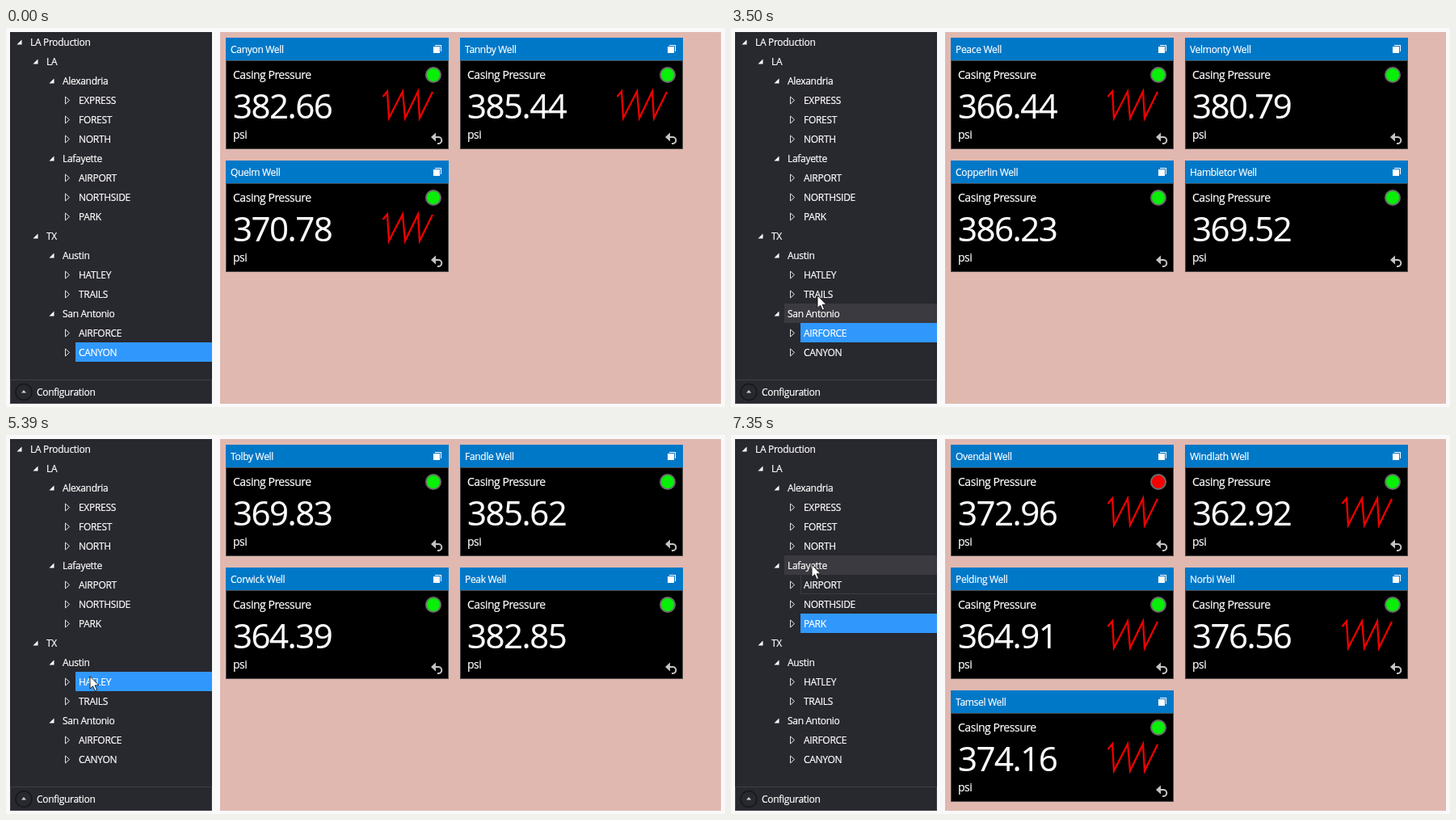
These frames come from a looping animation (890 by 469 pixels, 8000 ms). An HTML page:

```html
<!DOCTYPE html>
<html lang="en">
<head>
<meta charset="utf-8">
<title>Well dashboard</title>
<style>
  html, body { margin: 0; width: 100%; height: 100%; overflow: hidden; background: #f9f9f9; }
  svg { display: block; width: 890px; height: 469px; }
  text { font-family: "Open Sans", "Noto Sans", sans-serif; font-size: 12px; letter-spacing: -.3px;
    fill: #fff; stroke: #fff; stroke-width: .2px; }
  .label { font-size: 14px; letter-spacing: -.47px; }
  .value { font-size: 42px; letter-spacing: -1.5px; }
</style>
</head>
<body>
<svg viewBox="0 0 890 469" xmlns="http://www.w3.org/2000/svg">
  <rect x="5" y="5" width="250" height="460" fill="#28282f"/>
  <rect x="265" y="5" width="620" height="460" fill="#e0b8b0"/>
  <g id="marks"></g>
  <g id="tree"></g>
  <rect x="5.5" y="435.5" width="249" height="29" fill="none" stroke="#3e3e45"/>
  <circle cx="22" cy="450.5" r="10" fill="none" stroke="#17171b" stroke-width="1.5"/>
  <path d="M19 451.5l3-3.5 3 3.5z" fill="#d0d0d0"/>
  <text x="38" y="455">Configuration</text>
  <g id="cards"></g>
  <path id="cursor" d="M0 0V15.5L3.6 12.2 6.2 18 8.6 17 6.1 11.3H11Z" fill="#fff" stroke="#111" stroke-width=".9"/>
</svg>
<script>
const LOOP = 8000;
const $ = id => document.getElementById(id);

// Tree rows: one leading dot per level.
const rows = `LA Production
.LA
..Alexandria
...EXPRESS
...FOREST
...NORTH
..Lafayette
...AIRPORT
...NORTHSIDE
...PARK
.TX
..Austin
...HATLEY
...TRAILS
..San Antonio
...AIRFORCE
...CANYON`.split("\n").map(line => {
  const name = line.replace(/^\.+/, "");
  return { name, level: line.length - name.length };
});
const rowOf = name => rows.findIndex(r => r.name === name);

// Each scene: start, selected row, card start, wells, time each trend appears.
const scenes = [
  { at: 0, row: "CANYON", load: 0,
    wells: ["Canyon 382.66", "Tannby 385.44", "Quelm 370.78"], trends: [0, 0, 0] },
  { at: 2660, row: "AIRFORCE", load: 2730,
    wells: ["Peace 366.44", "Velmonty 380.79", "Copperlin 386.23", "Hambletor 369.52"],
    trends: [3500, 3640, 3710, 3710] },
  { at: 3850, row: "TRAILS", load: 3920,
    wells: ["Timberridge 382.76", "Tumbleweed 380.61", "Westward 363.19"],
    trends: [4130, 4130, 4200] },
  { at: 5180, row: "HATLEY", load: 5250,
    wells: ["Tolby 369.83", "Fandle 385.62", "Corwick 364.39", "Peak 382.85"],
    trends: [6020, 6020, 6090, 6090] },
  { at: 6650, row: "PARK", load: 6650, alarm: 0,
    wells: ["Ovendal 372.96", "Windlath 362.92", "Pelding 364.91", "Norbi 376.56", "Tamsel 374.16"],
    trends: [6860, 6860, 6930, 6930, 7000] }
];

const hovers = [
  [0, ""], [1470, "AIRFORCE"], [2660, ""], [2940, "San Antonio"], [3850, ""],
  [3920, "HATLEY"], [5180, ""], [5530, "Austin"], [5740, "TX"], [6090, "PARK"],
  [6650, ""], [6930, "NORTHSIDE"], [7070, "AIRPORT"], [7280, "Lafayette"]
];

// Cursor stops: time, x, y.
const stops = [
  [280, 171, 444], [770, 130, 406], [1330, 130, 406], [1820, 124, 376.5],
  [2660, 124, 376.5], [3220, 107, 331], [3850, 107, 331], [4200, 107, 307.5],
  [5180, 107, 307.5], [5390, 104, 298.5], [5950, 102, 250], [6160, 100.5, 235.5],
  [6860, 100.5, 235.5], [7350, 100, 160.5]
];

const last = (list, test) => list.filter(test).pop();
const rowTop = i => 5 + 24 * i;
const rowLeft = i => 26 + 20 * rows[i].level;

function bar(name, fill) {
  const i = rowOf(name);
  if (i < 0) return "";
  const x = rowLeft(i);
  return `<rect x="${x}" y="${rowTop(i)}" width="${255 - x}" height="24" fill="${fill}"/>`;
}

function fadedEdge(name) {
  const i = rowOf(name), x = rowLeft(i) + .5, y = rowTop(i) + .5;
  const top = name === "TX" ? `M255 ${y}H${x}` : `M${x} ${y}`;
  return `<path d="${top}V${y + 23}H255" fill="none" stroke="#3b3b42"/>`;
}

function treeRow({ name, level }, i) {
  const x = 20 * level, y = 17.5 + 24 * i;
  const arrow = level < 3
    ? `<path d="M${x + 19.5} ${y - 3}v6h-6z" fill="#fff"/>`
    : `<path d="M${x + 13.5} ${y - 4.5}v9l5-4.5z" fill="none" stroke="#e4e4e4"/>`;
  return `${arrow}<text x="${x + 30}" y="${y + 4.5}">${name}</text>`;
}

function card(well, i, trend, alarm) {
  const [name, value] = well.split(" ");
  const x = 272 + 290 * (i % 2), y = 12 + 152 * Math.floor(i / 2);
  const wave = `<path d="M194.5 73L200 66.5 202 99.5 219 66.5 222 99.5 238 66.5 240 99.5 256 67"
    fill="none" stroke="#f00000" stroke-width="2.3"/>`;
  return `<g transform="translate(${x} ${y})">
    <rect x=".5" y="28.5" width="275" height="109" stroke="#484848"/>
    <rect width="276" height="28" fill="#0078c8"/>
    <text x="6" y="19">${name} Well</text>
    <rect x="259" y="9" width="8" height="8" fill="#fff"/>
    <rect x="256.5" y="10.5" width="9" height="9" fill="#fff" stroke="#0078c8"/>
    <text class="label" x="9" y="51">Casing Pressure</text>
    <text class="value" x="9" y="100">${value}</text>
    <text class="label" x="9" y="125">psi</text>
    <circle cx="257" cy="46" r="9" fill="${alarm ? "#f40000" : "#08f008"}" stroke="#6c6c6c" stroke-width="2"/>
    <path d="M254 123l6-5.5v11z" fill="#c4c4c4"/>
    <path d="M259 123h4a4 4 0 0 1 .5 8h-1.5" fill="none" stroke="#c4c4c4" stroke-width="2"/>
    ${trend ? wave : ""}
  </g>`;
}

function setHTML(id, html) {
  const el = $(id);
  if (el.shown !== html) el.innerHTML = el.shown = html;
}

function placeCursor(t) {
  const k = stops.findIndex(s => s[0] > t);
  const b = stops[k < 0 ? stops.length - 1 : k];
  const a = stops[k < 0 ? stops.length - 1 : Math.max(0, k - 1)];
  const p = b[0] > a[0] ? (t - a[0]) / (b[0] - a[0]) : 0;
  const ease = p * p * (3 - 2 * p);
  const mix = n => a[n] + (b[n] - a[n]) * ease;
  $("cursor").setAttribute("transform", `translate(${mix(1)} ${mix(2)})`);
  $("cursor").setAttribute("visibility", t < 280 ? "hidden" : "visible");
}

function draw(t) {
  const selected = last(scenes, s => s.at <= t).row;
  const hover = last(hovers, h => h[0] <= t)[1];
  const edge = t >= 7280 ? fadedEdge("AIRPORT") : t >= 6090 && t < 6650 ? fadedEdge("TX") : "";
  setHTML("marks", bar(hover, "#3a3a40") + edge + bar(selected, "#3098fd"));

  const scene = last(scenes, s => s.load <= t);
  setHTML("cards", scene.wells.map((w, i) =>
    card(w, i, t >= scene.trends[i], scene.alarm === i)).join(""));
  placeCursor(t);
}

setHTML("tree", rows.map(treeRow).join(""));
draw(0);
let start;
function tick(now) {
  start ??= now;
  draw((now - start) % LOOP);
  requestAnimationFrame(tick);
}
requestAnimationFrame(tick);
</script>
</body>
</html>
```
